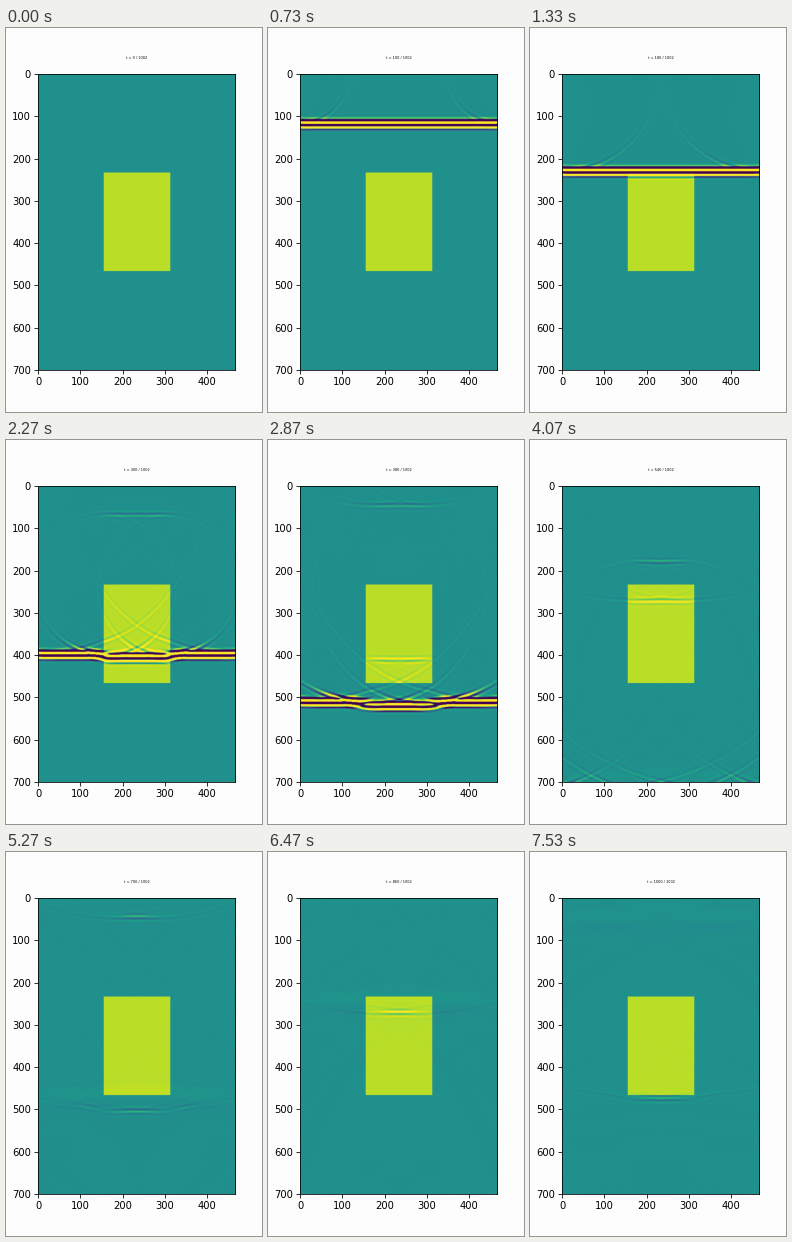
Write a matplotlib script that moves like this. It is 256 by 384 pixels and loops after 7670 ms.

```python
import math

import numpy as np
import matplotlib.pyplot as plt
from matplotlib.animation import FuncAnimation

NY, NX = 700, 467
HALF = NX // 2 + 1            # left half plus the symmetry axis
SPONGE = 40                   # hidden absorbing rows below the picture
STEPS, STRIDE, SUB = 1002, 20, 4
SPEED, RATIO = 1.4, 1.04      # cells per step, inclusion / background
FEED = 0.87                   # share of the front that the sides let pass
LOOP, TICKS = 7670, 115

block = np.zeros((NY + SPONGE, HALF + 2), np.float32)
block[NY // 3:2 * NY // 3, NX // 3:] = 1
depth = np.arange(NY + SPONGE)


def pulse(t):
    s = t - 16.4
    return 15 * np.sin(2 * np.pi * s / 8.45) * np.exp(-(s / 5.7) ** 2)


def second_diff(u, axis):
    """Second derivative, fourth order away from the border."""
    d = np.diff(u, 2, axis=axis)
    c = np.diff(d, 2, axis=axis)
    c *= np.float32(1 / 12)
    if axis == 0:
        d[1:-1] -= c
    else:
        d[:, 1:-1] -= c
    return d


def unfold(u):
    half = (u + np.float32(0.79) * block)[:NY, :HALF]
    return np.hstack([half, half[:, -2::-1]])


def simulate():
    courant = SPEED / SUB
    mur = (courant - 1) / (courant + 1)
    c2 = ((courant * (1 + (RATIO - 1) * block)) ** 2)[1:-1, 1:-1]
    c2 = c2.astype(np.float32)
    fade = np.exp(-0.1 * (np.arange(SPONGE) / SPONGE) ** 2)
    fade = fade.astype(np.float32)[:, None]
    old = np.zeros_like(block)
    u = np.zeros_like(block)
    front = pulse(-depth / SPEED)
    shots = [unfold(u)]
    for n in range(1, STEPS // STRIDE * STRIDE * SUB + 1):
        lap = second_diff(u[:, 1:-1], 0)
        lap += second_diff(u[1:-1], 1)
        lap *= c2
        lap += u[1:-1, 1:-1]
        lap += u[1:-1, 1:-1]
        lap -= old[1:-1, 1:-1]
        new = old
        new[1:-1, 1:-1] = lap
        # absorbing sides, fed with most of the passing front
        last, front = front, pulse(n / SUB - depth / SPEED)
        new[:, 0] = (u[:, 1] + mur * (new[:, 1] - u[:, 0])
                     + FEED * (1 - mur) * (front - last))
        # absorbing bottom, driven top, mirrored axis
        new[-1] = u[-2] + mur * (new[-2] - u[-1])
        new[0] = front[0]
        new[:, HALF:] = new[:, HALF - 2:HALF - 4:-1]
        new[NY:] *= fade
        u[NY:] *= fade
        old, u = u, new
        if n % (STRIDE * SUB) == 0:
            shots.append(unfold(u))
    return shots


shots = simulate()

plt.rcParams.update({
    "font.size": 11.25, "axes.linewidth": 0.9,
    "xtick.major.size": 4, "ytick.major.size": 4,
    "xtick.major.pad": 4, "ytick.major.pad": 4,
    "xtick.major.width": 0.9, "ytick.major.width": 0.9,
})
fig, ax = plt.subplots(figsize=(4, 6), dpi=64, facecolor="#fdfdfd")
fig.subplots_adjust(left=0.1235, right=0.8985)
image = ax.imshow(shots[0], cmap="viridis", vmin=-1, vmax=1,
                  extent=(0, NX, NY, 0), interpolation_stage="rgba")
label = ax.text(0.5, 1.05, "", transform=ax.transAxes, ha="center", fontsize=4)


def update(half_tick):
    # each shot lasts 2.25 ticks
    tick = min((half_tick + 1) // 2, TICKS - 1)
    k = math.ceil((tick + 0.5) / 2.25) - 1
    image.set_data(shots[k])
    label.set_text(f"t = {k * STRIDE} / {STEPS}")
    return image, label


anim = FuncAnimation(fig, update, frames=2 * TICKS,
                     interval=LOOP / (2 * TICKS), repeat=True, repeat_delay=0)
plt.show()
```
